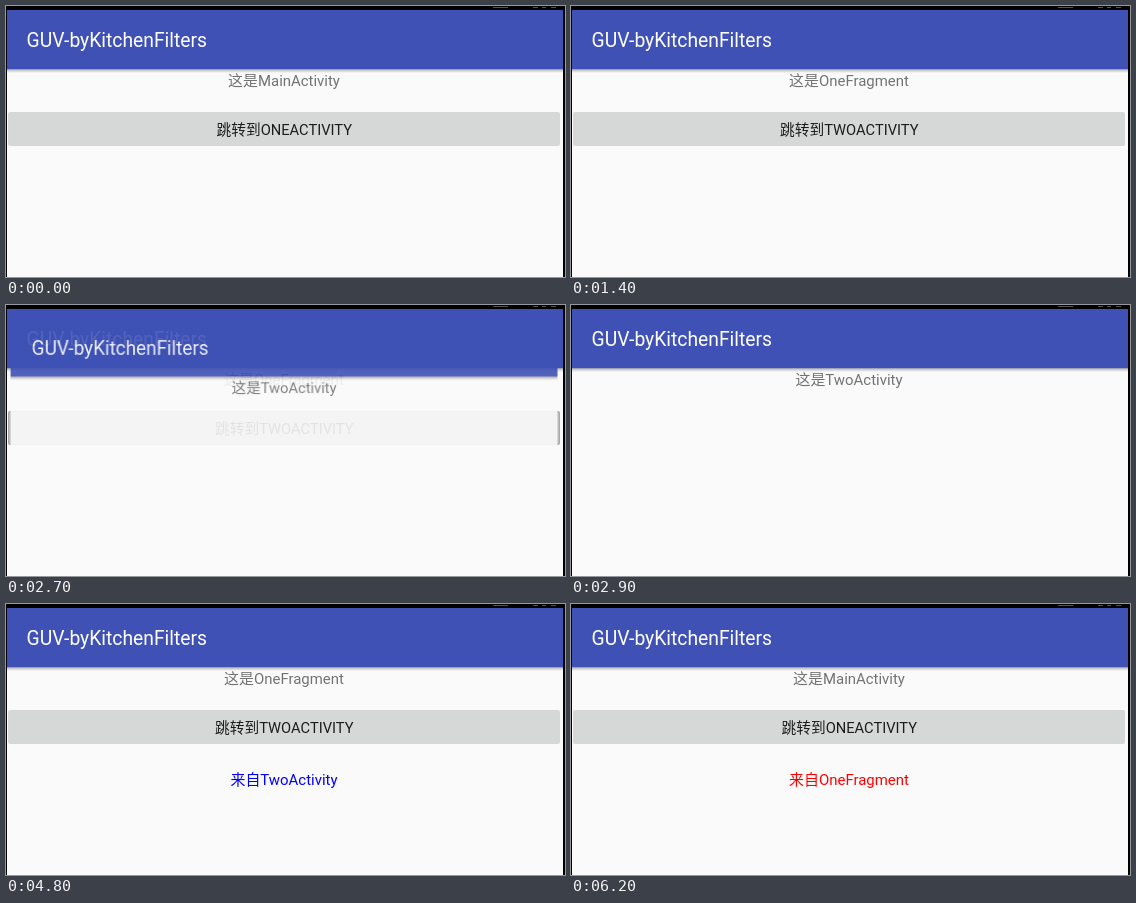
Animation of 559 by 271 pixels, one loop 7600 ms. Source, as an HTML page with a canvas:

```html
<!DOCTYPE html>
<html lang="zh">
<head>
<meta charset="utf-8">
<title>Activity transitions</title>
<style>
  html, body { margin: 0; width: 100%; height: 100%; overflow: hidden; background: #000; }
  canvas { display: block; }
</style>
</head>
<body>
<canvas id="stage" width="559" height="271"></canvas>
<script>
const W = 559, H = 271, LOOP = 7600, STEP = 100, DURATION = 300;
const PAGE = { left: -1, top: 4, width: 558 };
const PIVOT = { x: 278, y: 485 };
const MARGIN = 2;
const FONT = "Roboto, 'Noto Sans CJK SC', 'Noto Sans CJK', sans-serif";
const TITLE = 'GUV-byKitchenFilters';

const stage = document.getElementById('stage').getContext('2d');
const layer = document.createElement('canvas');
layer.width = W + 2 * MARGIN;
layer.height = H;
const layerCtx = layer.getContext('2d');
layerCtx.translate(MARGIN, 0);

const pages = {
  main: { label: '这是MainActivity', button: '跳转到ONEACTIVITY' },
  mainResult: { label: '这是MainActivity', button: '跳转到ONEACTIVITY', result: '来自OneFragment', color: '#f00' },
  one: { label: '这是OneFragment', button: '跳转到TWOACTIVITY' },
  onePressed: { label: '这是OneFragment', button: '跳转到TWOACTIVITY', pressed: true },
  oneResult: { label: '这是OneFragment', button: '跳转到TWOACTIVITY', result: '来自TwoActivity', color: '#00f' },
  two: { label: '这是TwoActivity' }
};

// lead: how far the transition has run when its first picture appears
const transitions = [
  { start: 1100, end: 1400, lead: 11, below: 'main', above: 'one', opening: true },
  { start: 2600, end: 2900, lead: 11, below: 'onePressed', above: 'two', opening: true },
  { start: 4600, end: 4800, lead: 19, below: 'oneResult', above: 'two' },
  { start: 6000, end: 6200, lead: 21, below: 'mainResult', above: 'oneResult' }
];

const still = [
  [6200, 'mainResult'], [4800, 'oneResult'], [2900, 'two'],
  [2500, 'onePressed'], [1400, 'one'], [0, 'main']
];

function text(c, str, x, y, color, size, align = 'center') {
  c.font = `${size}px ${FONT}`;
  c.textAlign = align;
  c.fillStyle = color;
  c.fillText(str, x, y);
}

function band(c, y, height, fill) {
  c.fillStyle = fill;
  c.fillRect(PAGE.left, y, PAGE.width, height);
}

function drawButton(c, page) {
  c.beginPath();
  c.roundRect(2, 106, 552, 34, 2);
  c.fillStyle = page.pressed ? '#bdbdbd' : '#d6d7d7';
  c.fill();
  if (page.pressed) {
    c.beginPath();
    c.roundRect(2.5, 106.5, 551, 33, 2);
    c.strokeStyle = '#a8a8a8';
    c.lineWidth = 1;
    c.stroke();
  }
  text(c, page.button, 278.3, 128.5, 'rgba(0,0,0,.87)', 14.7);
}

function drawPage(c, page) {
  const shadow = c.createLinearGradient(0, 63, 0, 67);
  shadow.addColorStop(0, 'rgba(0,0,0,.3)');
  shadow.addColorStop(1, 'rgba(0,0,0,0)');
  band(c, PAGE.top, H - PAGE.top, '#fafafa');
  band(c, 63, 4, shadow);
  band(c, PAGE.top, 59.2, '#3f51b5');
  text(c, TITLE, 20.5, 41, '#fff', 19.3, 'left');
  text(c, page.label, 278, 80, 'rgba(0,0,0,.54)', 14.95);
  if (page.button) drawButton(c, page);
  if (page.result) text(c, page.result, 278, 180.5, page.color, 14.95);
}

function drawStatusBar() {
  stage.fillStyle = '#000';
  stage.fillRect(0, 0, W, H);
  stage.fillStyle = '#555';
  for (const [x, w] of [[487, 15], [527, 5], [536, 4], [545, 5]]) stage.fillRect(x, 1, w, 1);
}

function drawTransition(tr, now) {
  const t = Math.min(1, (now - tr.start + tr.lead) / DURATION);
  const p = 1 - (1 - t) ** 5;
  const shown = tr.opening ? p : 1 - p;
  const scale = 0.8 + 0.2 * shown;

  drawPage(stage, pages[tr.below]);
  layerCtx.clearRect(-MARGIN, 0, layer.width, H);
  drawPage(layerCtx, pages[tr.above]);

  stage.globalAlpha = shown;
  stage.translate(PIVOT.x, PIVOT.y);
  stage.scale(scale, scale);
  stage.translate(-PIVOT.x, -PIVOT.y);
  stage.drawImage(layer, -MARGIN, 0);
  if (!tr.opening) band(stage, PAGE.top, 1, 'rgba(255,255,255,.4)');
}

function render(time) {
  const now = Math.floor((time % LOOP) / STEP) * STEP;
  const active = transitions.find(tr => now >= tr.start && now < tr.end);
  drawStatusBar();
  stage.save();
  stage.beginPath();
  stage.rect(1, PAGE.top, 556, H - PAGE.top);
  stage.clip();
  if (active) drawTransition(active, now);
  else drawPage(stage, pages[still.find(([from]) => now >= from)[1]]);
  stage.restore();
}

let origin;
function frame(time) {
  origin ??= time;
  render(time - origin);
  requestAnimationFrame(frame);
}
render(0);
requestAnimationFrame(frame);
</script>
</body>
</html>
```
